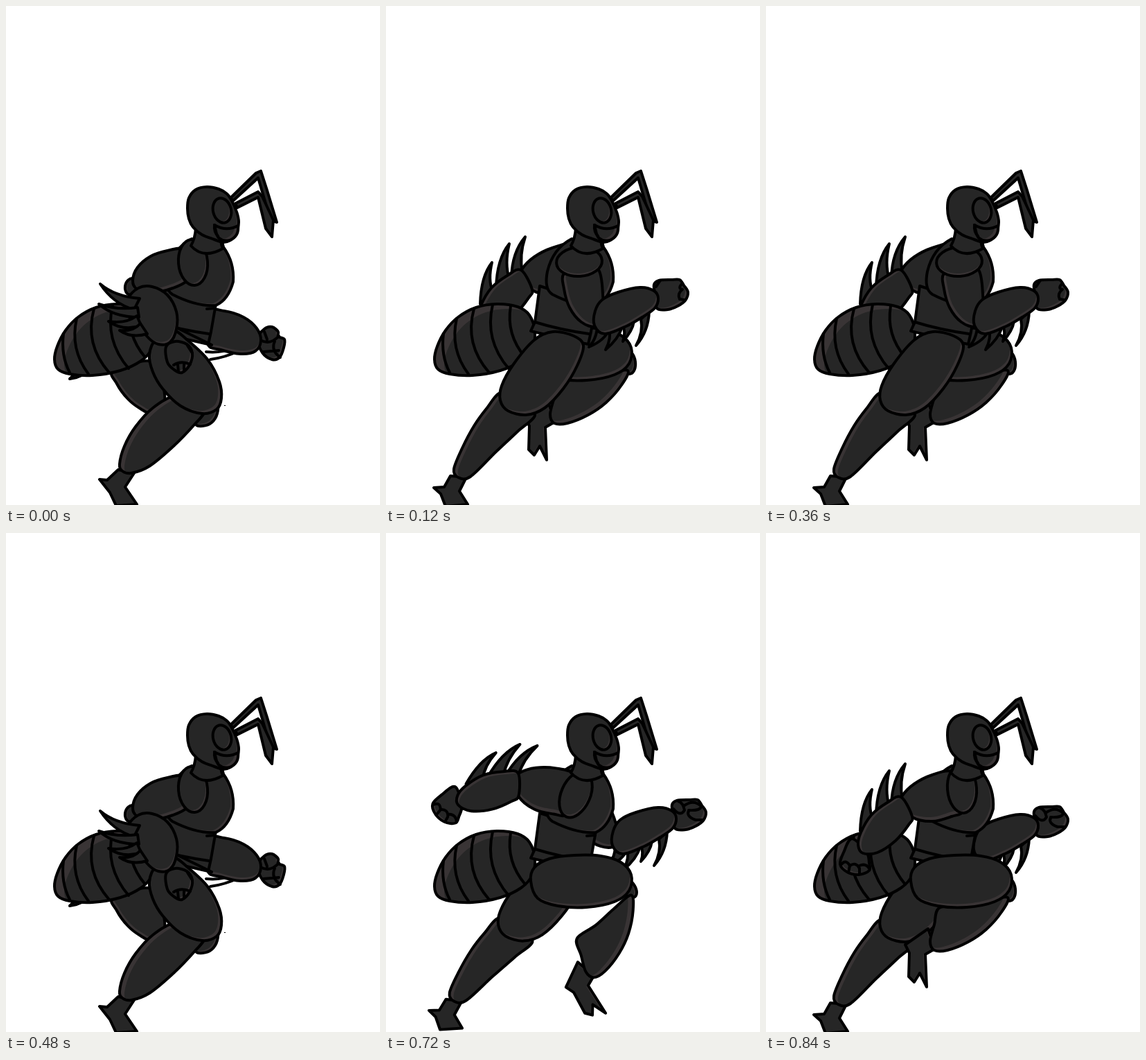
Recreate the animation shown at these times as an HTML page with a canvas. Size 540 by 720 pixels, loop 0.96 s.

```html
<!DOCTYPE html>
<html>
<head>
<meta charset="utf-8">
<title>Running insect</title>
<style>
  html, body { margin: 0; width: 100%; height: 100%; overflow: hidden; background: #fff; }
  canvas { display: block; }
</style>
</head>
<body>
<canvas id="stage" width="540" height="720"></canvas>
<script>
const ctx = document.getElementById('stage').getContext('2d');
const DARK = '#262626', LIGHT = '#393435', INK = '#000';

// Filled shape with a lit rim: the dark body is the outline moved by (dx, dy).
function shape(path, dx = 0, dy = 0) {
  ctx.fillStyle = LIGHT;
  ctx.fill(path);
  ctx.save();
  ctx.clip(path);
  ctx.translate(dx, dy);
  ctx.fillStyle = DARK;
  ctx.fill(path);
  ctx.restore();
  ctx.stroke(path);
}

// Closed smooth curve through the given points.
function blob(points, dx, dy) {
  const p = points.split(' ').map(s => s.split(',').map(Number));
  const at = i => p[(i + p.length) % p.length];
  const path = new Path2D();
  path.moveTo(...p[0]);
  p.forEach((b, i) => {
    const a = at(i - 1), c = at(i + 1), d = at(i + 2);
    path.bezierCurveTo(
      b[0] + (c[0] - a[0]) / 6, b[1] + (c[1] - a[1]) / 6,
      c[0] - (d[0] - b[0]) / 6, c[1] - (d[1] - b[1]) / 6, ...c);
  });
  path.closePath();
  shape(path, dx, dy);
}

const cut = (d, dx, dy) => shape(new Path2D(d), dx, dy);
const line = d => ctx.stroke(new Path2D(d));

function oval(x, y, rx, ry, tilt, dx, dy) {
  const path = new Path2D();
  path.ellipse(x, y, rx, ry, tilt, 0, 7);
  shape(path, dx, dy);
}

function turn(x, y, degrees, draw) {
  ctx.save();
  ctx.translate(x, y);
  ctx.rotate(degrees * Math.PI / 180);
  ctx.translate(-x, -y);
  draw();
  ctx.restore();
}

function shift(x, y, draw) {
  ctx.save();
  ctx.translate(x, y);
  draw();
  ctx.restore();
}

function head() {
  cut('M324,277L361,241L368,238L377,266L391,312L382,309L364,248L328,281Z');
  cut('M331,285L364,268L370,275L386,309L384,333L375,321L364,276L334,291Z', -2, 0);
  cut('M274,320Q273,336 267,346Q285,366 313,350Q309,342 313,338Z', 0, 3);
  blob('262,292 264,277 274,265 290,261 307,264 319,271 326,281 333,297 336,312 332,330 324,338 313,341 301,337 283,330 270,319 264,307', -3, -2);
  oval(312, 295, 13, 18, -.25, -3, -2);
  cut('M301,316Q318,326 335,317Q337,332 323,338Q308,341 304,329Z', -5, -3);
  line('M301,316Q300,326 306,332');
}

function abdomen() {
  blob('70,510 74,491 86,468 104,449 130,435 160,430 190,434 207,446 215,470 211,494 195,512 165,526 125,533 92,531 75,524', 14, 7);
  line('M83,473Q79,504 92,529M102,451Q92,495 119,531M127,437Q113,488 149,529M154,431Q142,482 177,523M180,433Q173,474 201,507');
}

function torso() {
  cut('M222,404L215,456L209,469L292,488L296,470L303,430Z', 2, -2);
  cut('M268,336Q241,350 233,383Q228,408 240,416Q275,434 303,432Q321,424 328,398Q330,370 314,348L312,340Z', -4, -3);
  line('M215,456Q250,467 293,473M290,437L302,436');
}

function spikes() {
  cut('M136,430Q137,390 153,370Q147,395 154,412Z');
  cut('M159,407Q160,365 178,343Q171,372 178,394Z');
  cut('M181,392Q182,355 201,333Q192,360 197,384Z');
}

function backArm() {
  spikes();
  blob('107,478 112,461 124,441 145,460 149,476 149,487 134,493 117,489', 2, -3);
  line('M109,478Q115,470 121,480L119,490M121,480Q130,474 135,484L135,492M135,480Q144,476 149,484');
  blob('268,344 240,349 214,362 197,379 196,390 211,410 240,416 268,409 286,400 290,365', -3, -6);
  blob('195,381 175,389 152,407 137,432 133,450 140,462 161,461 187,444 206,421 211,409', 5, 2);
  oval(283, 369, 21, 35, -.08, -3, -3);
}

function forearm() {
  cut('M305,457Q306,478 293,492Q317,482 322,466Z');
  cut('M322,462Q326,480 317,496Q336,480 341,463Z');
  cut('M341,460Q347,470 342,484Q356,469 358,455Z');
  cut('M368,452Q372,470 361,490Q379,470 380,440Z');
  blob('301,461 302,440 312,424 335,413 367,406 387,411 393,422 388,436 370,449 347,462 316,473', -3, -4);
}

function fist(open) {
  blob('391,436 388,414 387,402 394,396 412,395 424,395 430,403 436,413 432,425 421,433 407,438', -4, -3);
  line(open
    ? 'M389,408Q399,420 405,410Q403,399 396,397M405,403Q418,394 429,404Q429,411 411,410M411,411Q407,419 421,424L432,424'
    : 'M390,405L396,396M427,401Q421,408 428,409Q420,415 424,423L431,424');
}

function frontArm(near, reach = 0) {
  turn(283, 367, -18 * reach, () => {
    blob('257,386 257,408 265,435 282,456 302,462 312,443 313,415 307,381 284,375', 5, -3);
    if (near) oval(279, 369, 33, 21, -.06, 0, -4);
  });
  shift(26 * reach, -10 * reach, () => {
    fist(!near);
    forearm();
  });
}

function backLeg() {
  cut('M69,695L84,694L93,678L116,680L106,700L118,719L86,722L79,704Z', 2, 0);
  blob('166,558 145,581 127,606 110,638 98,668 104,680 122,679 159,643 190,614 215,590 190,575', 6, 2);
  blob('214,482 241,470 271,476 285,490 276,519 256,552 229,580 202,590 176,584 165,569 167,548 184,517', -4, -5);
}

function frontLeg(reach = 0) {
  turn(345, 515, -30 * reach, () => {
    cut('M201,594L234,571L244,600L230,608L232,655L222,635L214,648L206,640L207,606Z', -3, 0);
    oval(350, 514, 10, 17, -.15, -3, -2);
    blob('250,541 283,538 320,530 349,526 340,547 318,572 292,590 262,602 243,602 237,589 243,565', -6, -5);
  });
  blob('209,502 214,483 236,470 272,465 310,466 339,475 354,493 351,516 330,532 290,540 248,538 219,527', -3, -5);
}

// Far-side limbs, body and near-side limbs of a stride; reach opens it further.
function nearArmForward(reach) {
  turn(262, 355, 28 * reach, backArm);
  abdomen();
  frontLeg(reach);
  torso();
  turn(240, 490, 2 * reach, backLeg);
  frontArm(true, reach);
}

function nearArmBack(reach) {
  frontArm(false, reach);
  turn(240, 490, 2 * reach, backLeg);
  abdomen();
  torso();
  frontLeg(reach);
  turn(262, 355, 28 * reach, backArm);
}

function passing() {
  // far side
  cut('M92,538L101,529L117,530L102,536Z');
  blob('155,526 160,545 176,567 194,581 212,588 229,570 222,533 205,512', 3, -4);
  line('M289,499Q310,501 327,494M295,510Q317,507 335,498');
  blob('363,480 373,466 384,463 393,470 393,477 402,481 401,493 395,507 384,510 370,500', -3, -3);
  line('M367,482Q382,490 394,476M373,470L377,481M388,484Q382,497 396,507M371,499L394,497');
  blob('294,442 315,440 343,449 362,465 368,483 360,498 339,502 310,496 291,487', 0, -5);
  oval(181, 405, 9, 12, .2, 3, 0);
  abdomen();
  torso();
  line('M246,464L297,489');
  // near leg
  cut('M135,683L146,684L162,669L185,674L172,694L189,719L159,721L150,702Z', 2, 0);
  blob('274,603 282,584 304,574 305,588 297,601 284,606', -3, -3);
  blob('164,661 171,635 187,607 212,580 243,563 270,572 286,585 272,604 242,635 207,664 181,674 168,671', 7, 3);
  blob('207,503 217,480 241,468 263,483 291,510 308,542 311,566 304,582 283,588 252,577 226,552 212,528', -5, -4);
  // near arm
  blob('231,492 244,484 261,488 269,501 265,518 254,529 243,525 233,514', -3, -3);
  line('M262,490L269,501M242,518Q253,511 266,517M249,528L248,517M257,526L257,515');
  blob('257,351 233,353 209,361 190,377 183,396 189,408 215,413 241,407 262,396 278,372', -4, -5);
  blob('177,423 191,407 211,405 233,417 246,441 246,466 237,485 220,488 203,476 186,448', -2, -4);
  cut('M185,438Q155,430 136,401Q157,419 193,422Z');
  cut('M192,449Q155,449 134,430Q160,439 190,435Z');
  cut('M195,461Q170,470 148,455Q173,459 189,447Z');
  cut('M204,473Q181,480 164,468Q184,470 194,458Z');
  oval(270, 370, 21, 33, -.08, -3, -3);
  ctx.fillStyle = INK;
  ctx.fillRect(315, 576, 2, 1);
}

const poses = [
  passing, () => nearArmForward(0), () => nearArmForward(1), () => nearArmForward(0),
  passing, () => nearArmBack(0), () => nearArmBack(1), () => nearArmBack(0),
];
const start = performance.now();

function render() {
  const time = Math.max(0, performance.now() - start) % 960;
  ctx.fillStyle = '#fff';
  ctx.fillRect(0, 0, 540, 720);
  ctx.strokeStyle = INK;
  ctx.lineWidth = 4;
  ctx.lineJoin = ctx.lineCap = 'round';
  poses[Math.floor(time / 120)]();
  head();
  requestAnimationFrame(render);
}
render();
</script>
</body>
</html>
```
